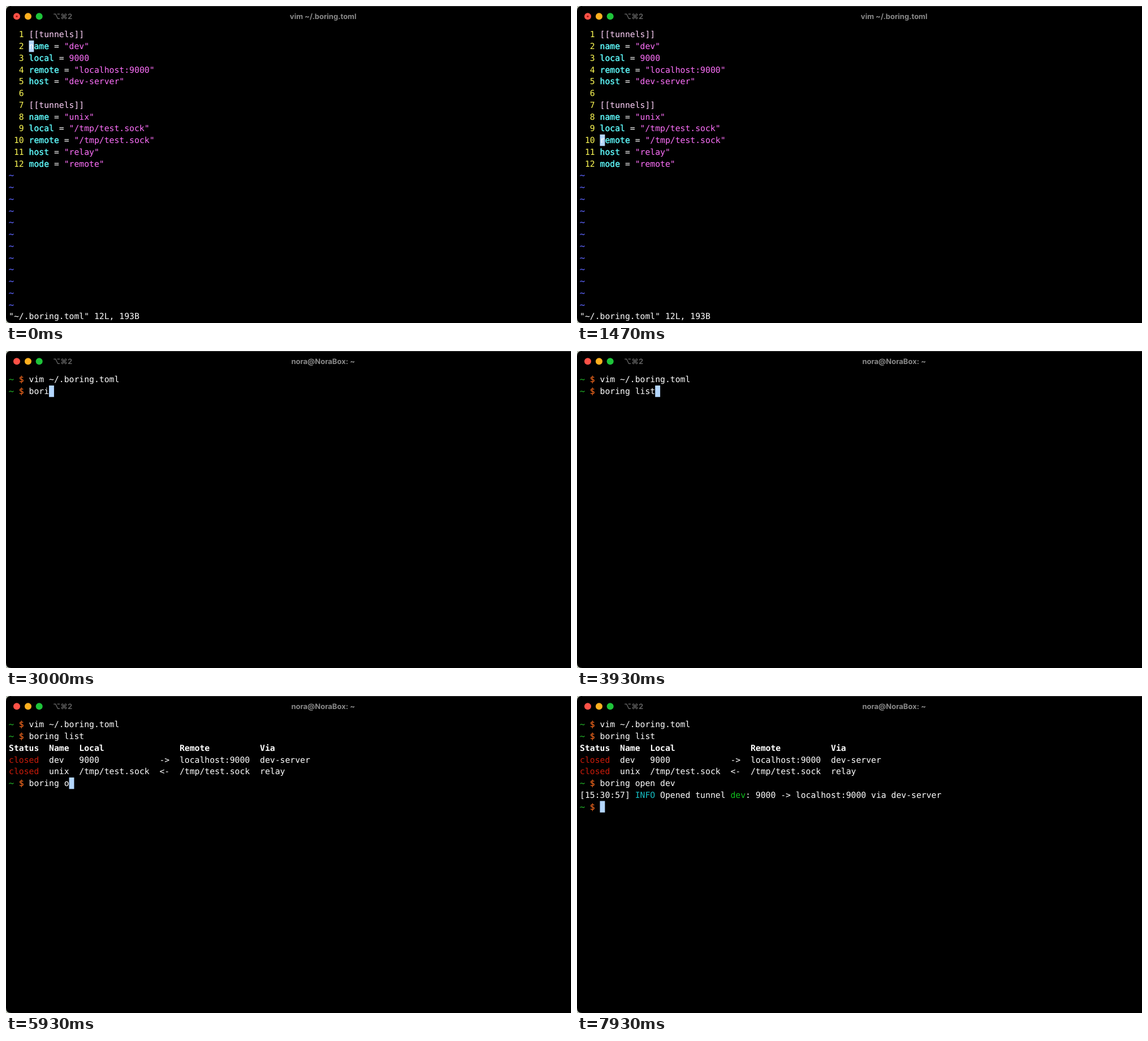
Write an HTML page that moves like this. It is 999 px wide and 560 px high and loops after 8 s.

```html
<!DOCTYPE html>
<html lang="en">
<head>
<meta charset="utf-8">
<title>Terminal</title>
<style>
  html, body { margin: 0; width: 100%; height: 100%; overflow: hidden; background: #000; }
  svg { display: block; width: 999px; height: 560px; }
  text { white-space: pre; text-rendering: geometricPrecision; }
  #screen { font: 14.75px "DejaVu Sans Mono", monospace; }
  #title, #tab { font: 700 13px Inter, "DejaVu Sans", sans-serif; }
  .head { font-weight: 700; }
  .key, .blue, .green, .orange { stroke: currentColor; stroke-width: .4px; }
</style>
</head>
<body>
<svg viewBox="0 0 999 560">
  <rect width="999" height="560" fill="#c3c9bd"/>
  <path d="M999 0H9Q0 0 0 9V551Q0 560 9 560H999Z" fill="#000"/>
  <path d="M999 .5H9" stroke="#383838" fill="none"/>
  <circle cx="19" cy="18.3" r="6" fill="#ff5147"/>
  <circle id="busy" cx="19" cy="18.3" r="1.6" fill="#a0140f"/>
  <circle cx="39" cy="18.3" r="6" fill="#ffb01f"/>
  <circle cx="58.7" cy="18.3" r="6" fill="#1ec43a"/>
  <text id="tab" x="83" y="23" fill="#5e5e5e">⌥⌘2</text>
  <text id="title" x="560.7" y="23" text-anchor="middle" fill="#8a8a8a"></text>
  <g id="screen"></g>
</svg>
<script>
const LOOP = 8000, CELL = 8.88, LINE = 20.75, LEFT = 5, TOP = 39.8, BASE = 15.6;
const C = {
  white: '#fff', head: '#fff', yellow: '#fffb55', pink: '#ffd2fa', key: '#60fdff',
  value: '#ff70fb', blue: '#555be6', green: '#1f9a24', orange: '#e0601c', red: '#c91b0a',
  info: '#16bfc4', ok: '#0fc21c', cursor: '#b4d7ff'
};

// Key times in ms
const MOVE_STEP = 180, COLON = 1930, QUIT_KEY = 2070, VIM_EXIT = 2200;
const LIST_KEYS = [2670, 2800, 2870, 3000, 3070, 3200, 3330, 3530, 3730, 3800, 3930];
const LIST_RUN = 4070, LIST_DONE = 4130, BLINK_OFF = 4600, BLINK_ON = 5070;
const OPEN_KEYS = [5130, 5270, 5330, 5400, 5470, 5600, 5730, 5870,
                   6000, 6070, 6200, 6270, 6400, 6470, 6600];
const OPEN_RUN = 6930, OPEN_DONE = 7530;

const FILE = '~/.boring.toml';
const SHELL = 'nora@NoraBox: ~';
const LIST = 'boring list', OPEN = 'boring open dev';

const CONFIG = [
  '[[tunnels]]', 'name = "dev"', 'local = 9000', 'remote = "localhost:9000"',
  'host = "dev-server"', '',
  '[[tunnels]]', 'name = "unix"', 'local = "/tmp/test.sock"',
  'remote = "/tmp/test.sock"', 'host = "relay"', 'mode = "remote"'
];

const TABLE = [
  [['head', 'Status  Name  Local               Remote          Via']],
  [['red', 'closed'], ['white', '  dev   9000            ->  localhost:9000  dev-server']],
  [['red', 'closed'], ['white', '  unix  /tmp/test.sock  <-  /tmp/test.sock  relay']]
];
const OPENED = [
  ['white', '[15:30:57] '], ['info', 'INFO'], ['white', ' Opened tunnel '],
  ['ok', 'dev'], ['white', ': 9000 -> localhost:9000 via dev-server']
];

const prompt = cmd => [['green', '~ '], ['orange', '$ '], ['white', cmd]];
const typed = (cmd, keys, t) => cmd.slice(0, keys.filter(k => t >= k).length);

function configRow(line, i) {
  const num = ['yellow', String(i + 1).padStart(3) + ' '];
  const [key, value] = line.split(' = ');
  return value ? [num, ['key', key], ['white', ' = '], ['value', value]]
               : [num, ['pink', line]];
}

function vim(t) {
  const rows = CONFIG.map(configRow);
  while (rows.length < 24) rows.push([['blue', '~']]);
  const cmd = t >= QUIT_KEY ? ':q' : ':';
  const commanding = t >= COLON;
  rows.push([['white', commanding ? cmd : `"${FILE}" 12L, 193B`]]);
  const line = Math.min(11, 1 + Math.floor(t / MOVE_STEP));
  const cursor = commanding ? [24, cmd.length] : [line, 4, CONFIG[line][0]];
  return { title: 'vim ' + FILE, busy: true, rows, cursor };
}

function shell(t) {
  const rows = [prompt('vim ' + FILE)];
  let title = SHELL, busy = false, cursor;
  const ask = cmd => {
    rows.push(prompt(cmd));
    cursor = [rows.length - 1, 4 + cmd.length];
  };
  const run = cmd => {
    title = cmd;
    busy = true;
    cursor = [rows.length, 0];
  };
  ask(typed(LIST, LIST_KEYS, t));
  if (t >= LIST_DONE) {
    rows.push(...TABLE);
    ask(typed(OPEN, OPEN_KEYS, t));
    if (t >= OPEN_DONE) {
      rows.push(OPENED);
      ask('');
    } else if (t >= OPEN_RUN) run(OPEN);
  } else if (t >= LIST_RUN) run(LIST);
  if (t >= BLINK_OFF && t < BLINK_ON) cursor = null;
  return { title, busy, rows, cursor };
}

const $ = id => document.getElementById(id);
const esc = s => s.replace(/&/g, '&amp;').replace(/</g, '&lt;');
const px = col => (LEFT + col * CELL).toFixed(2);
const py = (row, dy = 0) => (TOP + row * LINE + dy).toFixed(2);

function glyphs(row, col, color, s) {
  return `<text class="${color}" x="${px(col)}" y="${py(row, BASE)}"`
    + ` color="${C[color]}" fill="currentColor">${esc(s)}</text>`;
}

function rowMarkup(segments, row) {
  let col = 0, out = '';
  for (const [color, s] of segments) {
    // Place each word on the cell grid.
    for (const m of s.matchAll(/\S+/g)) out += glyphs(row, col + m.index, color, m[0]);
    col += s.length;
  }
  return out;
}

function cursorMarkup([row, col, ch = '']) {
  return `<rect x="${px(col)}" y="${py(row, .4)}" width="${CELL}" height="20.3" fill="${C.cursor}"/>`
    + (ch && glyphs(row, col, 'white', ch));
}

let last = '';
function draw() {
  const t = performance.now() % LOOP;
  const state = t < VIM_EXIT ? vim(t) : shell(t);
  const markup = state.rows.map(rowMarkup).join('')
    + (state.cursor ? cursorMarkup(state.cursor) : '');
  if (markup + state.title !== last) {
    last = markup + state.title;
    $('screen').innerHTML = markup;
    $('title').textContent = state.title;
    $('busy').style.display = state.busy ? '' : 'none';
  }
  requestAnimationFrame(draw);
}
draw();
</script>
</body>
</html>
```
